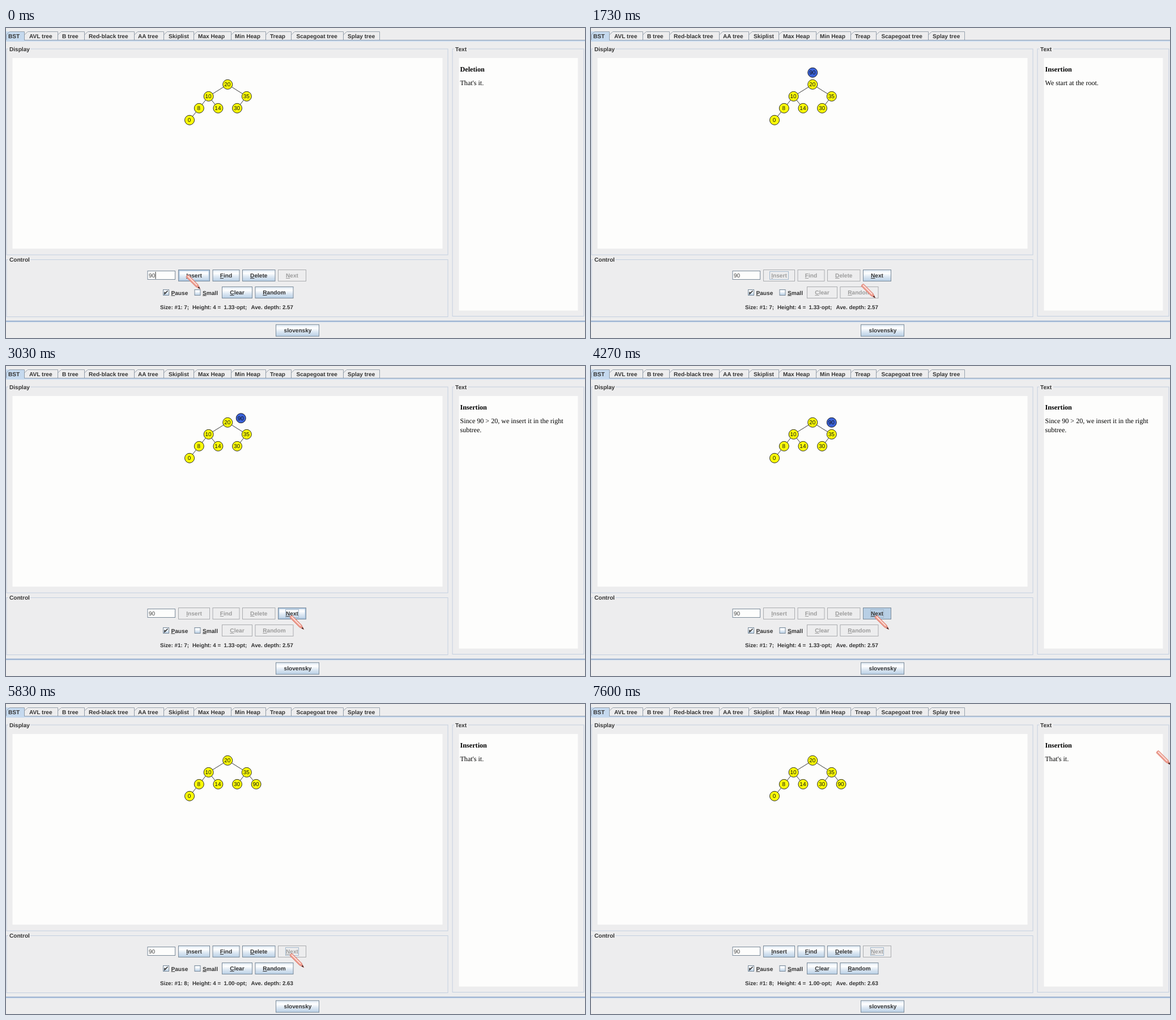
An HTML page that plays this animation: 1022 px wide and 548 px high, repeating every 7.63 s.

```html
<!DOCTYPE html>
<html lang="en">
<head>
<meta charset="utf-8">
<title>Binary search tree insertion</title>
<style>
  html, body { margin: 0; width: 100%; height: 100%; overflow: hidden; background: #ededee; }
  svg { display: block; width: 1022px; height: 548px; }
  text { font: 10px "Liberation Sans", Arial, sans-serif; fill: #111; text-rendering: geometricPrecision; white-space: pre; }
  .ui { font-weight: bold; font-size: 10.1px; fill: #333; }
  .stat { font-size: 9.75px; }
  .off { fill: #9c9c9c; }
  .field { fill: #444; }
  .mid { text-anchor: middle; }
  .doc { font: 12.05px "Liberation Serif", "Times New Roman", serif; fill: #000; }
  .head { font-weight: bold; font-size: 12.2px; }
  .key { text-decoration: underline; }
</style>
</head>
<body>
<svg viewBox="0 0 1022 548">
  <defs>
    <linearGradient id="steel" x2="0" y2="1">
      <stop offset="0" stop-color="#dde8f3"/>
      <stop offset=".3" stop-color="#fff"/>
      <stop offset=".6" stop-color="#dde8f3"/>
      <stop offset="1" stop-color="#b8cfe5"/>
    </linearGradient>
    <clipPath id="view"><rect x="11.5" y="53" width="759" height="337"/></clipPath>
  </defs>
  <g id="fixed"></g>
  <g id="live"></g>
  <g id="pencil">
    <g transform="translate(2.5 2.5) rotate(45)">
      <path d="M-1-2.8H23L31.5 0 23 2.8H-1Q-2.6 0-1-2.8Z" fill="#eb9789" stroke="#d87c70" stroke-width=".7"/>
      <path d="M0-.6H23" stroke="#fce0da" stroke-width="2"/>
      <path d="M27-1.5L31.5 0 27 1.5Z" fill="#3a2626"/>
    </g>
  </g>
</svg>
<script>
const LOOP = 7630, STEP = 50, STEPS = 10;
const $ = id => document.getElementById(id);

// Clicks: [press, release]
const clicks = [[420, 540], [2540, 2660], [4220, 4340], [5080, 5200]];
const [start, right, link, done] = clicks.map(c => c[1]);

const tabs = [
  ['BST', 0, 4], ['AVL tree', 32, 41], ['B tree', 91, 99], ['Red-black tree', 138, 146],
  ['AA tree', 226, 233], ['Skiplist', 278, 287], ['Max Heap', 331, 339], ['Min Heap', 397, 404],
  ['Treap', 458, 466], ['Scapegoat tree', 503, 512.5], ['Splay tree', 595, 603]
];

const buttons = {
  Insert: [304, 427, 56], Find: [364.5, 427, 48], Delete: [417, 427, 58.5], Next: [480, 427, 50],
  Clear: [381, 457, 54], Random: [439.5, 457, 68]
};

// Tree units, measured from the root: 20 across and 25 down per level
const SCALE = .84;
const place = ([x, y]) => [391.2 + x * SCALE, 99.8 + y * SCALE];

// key: [x, y, parent]
const nodes = {
  20: [0, 0], 10: [-40, 25, 20], 35: [40, 25, 20], 8: [-60, 50, 10],
  14: [-20, 50, 10], 30: [20, 50, 35], 0: [-80, 75, 8]
};

// Stops of the new node: [time, x, y]
const stops = [[start, -462, -64], [start, 0, -25], [right, 40, 0], [link, 60, 50]];

// Pointer: [time, x, y]
const path = [
  [0, 318, 436.5], [90, 318, 436.5], [330, 328, 437], [1430, 328, 437], [1530, 350, 447],
  [1630, 415, 460], [1730, 477, 452.5], [1950, 501, 441], [5870, 501, 441], [6050, 640, 440],
  [6290, 807, 422], [7160, 807, 422], [7330, 890, 300], [7560, 998, 82.5]
];

const rect = (x, y, w, h, fill, stroke = 'none', sw = 1) =>
  `<rect x="${x}" y="${y}" width="${w}" height="${h}" fill="${fill}" stroke="${stroke}" stroke-width="${sw}"/>`;
const text = (s, x, y, cls = 'ui') => `<text x="${x}" y="${y}" class="${cls}">${s}</text>`;
const line = (d, color, sw = 1) => `<path d="${d}" fill="none" stroke="${color}" stroke-width="${sw}"/>`;
const hotkey = s => `<tspan class="key">${s[0]}</tspan>${s.slice(1)}`;

function panel(title, x, y, w, h, gap) {
  return rect(x, y, w, h, 'none', '#c3cfe0') + rect(x + 3, y - 3, gap, 6, '#ededee') + text(title, x + 5, y + 3.7);
}

function button(name, { on, pressed, hover, focus }) {
  const [x, y, w] = buttons[name], h = 21, half = name.length * 2.5 + 2;
  let out = rect(x + .5, y + .5, w - 1, h - 1, !on ? '#ededee' : pressed ? '#b8cfe5' : 'url(#steel)', on ? '#7a8a99' : '#aaacaf');
  if (on && hover && !pressed) out += rect(x + 1.7, y + 1.7, w - 3.4, h - 3.4, 'none', '#a9c3dd', 1.5);
  if (focus) out += rect(x + w / 2 - half + .5, y + 3.5, 2 * half - 1, 14, 'none', '#a3b8cc');
  return out + text(hotkey(name), x + w / 2, y + 14, on ? 'ui mid' : 'ui mid off');
}

function checkbox(label, x, checked) {
  return rect(x + .5, 462.5, 10, 10, 'url(#steel)', '#7a8a99') +
    (checked ? line(`M${x + 3} 466.5V470L${x + 8.5} 464.5`, '#333', 1.6) : '') +
    text(hotkey(label), x + 14.5, 471.5);
}

function drawFixed() {
  let out = line('M0 21.5H1022', '#8b9cb2') + rect(0, 22, 1022, 2, '#cbdcee') + rect(0, 6, 32, 18, '#c5d9ee');
  tabs.forEach(([name, x, tx], i) => {
    const end = i < tabs.length - 1 ? tabs[i + 1][1] : 659;
    out += line(`M${x + .5} 21V12L${x + 6.5} 6.5H${end + .5}V21`, '#8f9aa6', .9) + text(name, tx, 17.8);
  });
  out += panel('Display', 1, 37, 779, 364, 39) + rect(11.5, 53, 759, 337, '#fdfdfc');
  out += panel('Control', 1, 409.5, 779, 101, 39);
  out += panel('Text', 788, 37, 232, 472.5, 25) + rect(799.5, 53, 210, 446.5, '#fdfdfc');
  out += checkbox('Pause', 277, true) + checkbox('Small', 332.5, false);
  out += rect(0, 517.5, 1022, 2, '#8aa6cb') + rect(0, 519.5, 1022, 1, '#d5e2f0');
  out += rect(476.5, 524.3, 76, 20.7, 'url(#steel)', '#7a8a99') + text('slovensky', 515, 538.4, 'ui mid');
  out += rect(250, 429.5, 48.5, 15, '#fdfdfc', '#7a8a99') + text('90', 252, 441, 'field');
  $('fixed').innerHTML = out;
}

function pointerAt(t) {
  const i = path.findIndex(p => p[0] > t);
  if (i < 0) return path[path.length - 1].slice(1);
  const a = path[i - 1], b = path[i], f = (t - a[0]) / (b[0] - a[0]);
  return [a[1] + (b[1] - a[1]) * f, a[2] + (b[2] - a[2]) * f];
}

// Whole-unit steps: each covers an equal share of what is left, rounded down
function glide(from, to, count) {
  for (let left = STEPS; left > STEPS - count; left--) from += Math.trunc((to - from) / left);
  return from;
}

function newNodeAt(t) {
  let i = 1;
  while (i < stops.length - 1 && t >= stops[i + 1][0]) i++;
  const a = stops[i - 1], b = stops[i];
  const count = Math.min(STEPS, Math.floor((t - b[0]) / STEP));
  return [glide(a[1], b[1], count), glide(a[2], b[2], count)];
}

function drawTree(t) {
  const all = { ...nodes };
  if (t >= start) all[90] = [...newNodeAt(t), t >= link ? 35 : undefined];
  let edges = '', balls = '';
  for (const [key, node] of Object.entries(all)) {
    const [x, y] = place(node), parent = node[2];
    if (parent !== undefined) edges += line(`M${place(all[parent])}L${x} ${y}`, '#222', .9);
    const fill = key === '90' && t < done ? '#3b63da' : '#fdfd08';
    balls += `<circle cx="${x}" cy="${y}" r="8.5" fill="${fill}" stroke="#111" stroke-width=".9"/>` +
      text(key, x - .5, y + 3.6, 'mid');
  }
  return `<g clip-path="url(#view)">${edges}${balls}</g>`;
}

function drawNotes(t) {
  const busy = t >= start && t < done;
  const lines = !busy ? ["That's it."]
    : t < right ? ['We start at the root.']
    : [`Since 90 &gt; ${t < link ? 20 : 35}, we insert it in the right`, 'subtree.'];
  return text(t < start ? 'Deletion' : 'Insertion', 801.5, 76.8, 'doc head') +
    lines.map((s, i) => text(s, 801.5, 100.7 + 16 * i, 'doc')).join('');
}

function drawStats(t) {
  const [size, ratio, depth] = t < done ? [7, '1.33', '2.57'] : [8, '1.00', '2.63'];
  const parts = [[`Size: #1: ${size};`, 272], ['Height: 4 =', 329], [`${ratio}·opt;`, 384.5], [`Ave. depth: ${depth}`, 432.5]];
  return parts.map(([s, x]) => text(s, x, 497.2, 'ui stat')).join('');
}

function drawControls(t, [px, py]) {
  const busy = t >= start && t < done;
  const focus = t < clicks[0][0] ? '' : t < clicks[1][0] ? 'Insert' : 'Next';
  const down = clicks.some(([a, b]) => t >= a && t < b);
  let out = '';
  for (const [name, [x, y, w]] of Object.entries(buttons)) {
    const hover = px >= x && px <= x + w && py >= y && py <= y + 21;
    out += button(name, {
      on: (name === 'Next') === busy, hover,
      pressed: hover && down, focus: name === focus
    });
  }
  if (!focus) out += line('M264 431V443.5', '#222');
  return out;
}

function render(t) {
  const p = pointerAt(t);
  $('live').innerHTML = drawTree(t) + drawNotes(t) + drawControls(t, p) + drawStats(t);
  $('pencil').setAttribute('transform', `translate(${p[0]} ${p[1]})`);
}

drawFixed();
render(0);
const begin = performance.now();
requestAnimationFrame(function tick() {
  render((performance.now() - begin) % LOOP);
  requestAnimationFrame(tick);
});
</script>
</body>
</html>
```
